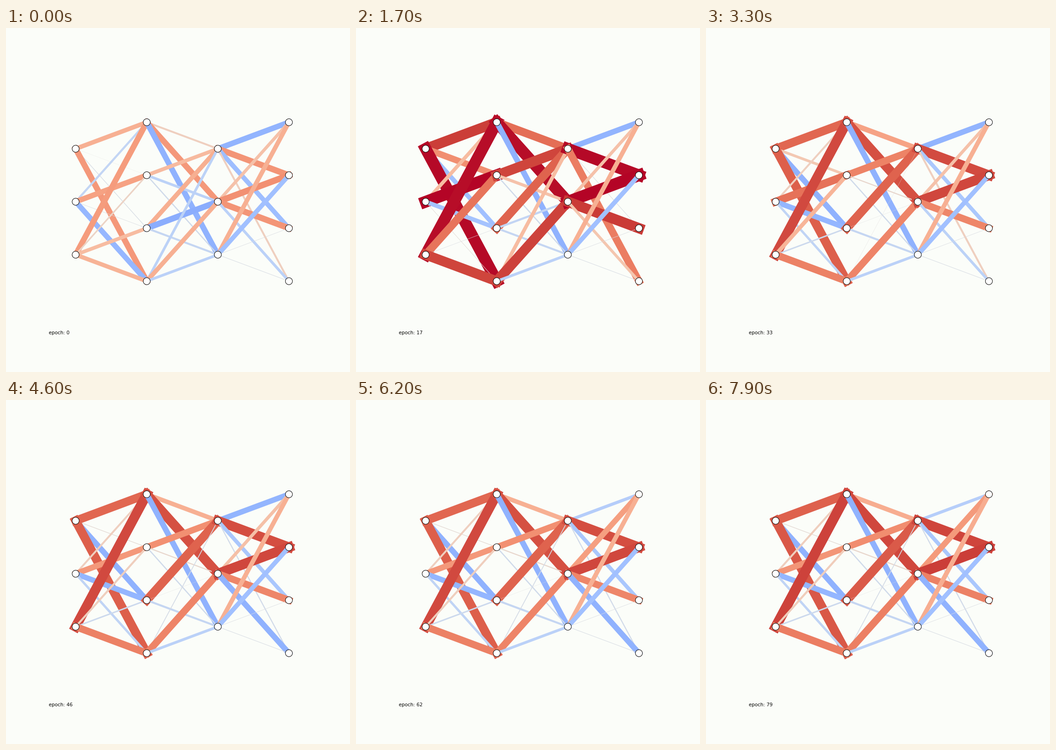
Animation, 748 px wide and 748 px high, one loop 8000 ms. Source, as a matplotlib script:

```python
import matplotlib.pyplot as plt
import numpy as np
from matplotlib.animation import FuncAnimation
from matplotlib.patches import Circle

SIZE, DPI = 748, 64
PT = 72 / DPI              # points per pixel
EPOCHS, STEP_MS = 80, 100
LINK_PX = 25.5             # link width at full weight
PEAK_EPOCH, SETTLE, LATE = 17, 20, 62
BG = "#fbfdf9"


class Layer:
    """Links into one layer.

    All links into a node drift together: up to its peak, then over to its
    rest value around its middle epoch. Gains scale this per sending node.
    """

    def __init__(self, start, peak, rest, middle, peak_gain=1, rest_gain=1):
        self.start = np.array(start)
        rows = np.ones(len(start))
        self.peak = np.outer(rows * peak_gain, peak)
        self.rest = np.outer(rows * rest_gain, rest)
        self.middle = np.array(middle)

    def weights(self, t):
        u = min(t / PEAK_EPOCH, 1)
        rise = u * (1.25 - .25 * u)
        settle = smooth((t - self.middle) / SETTLE + .5)
        w = self.start + rise * self.peak + settle * (self.rest - self.peak)
        swell = 1 + .035 * max(t - LATE, 0) / (EPOCHS - 1 - LATE)
        return np.where(w > 0, w * swell, w)


def smooth(x):
    x = np.clip(x, 0, 1)
    return x * x * (3 - 2 * x)


def column(x, n):
    gap, mid = 115.19, 377.74
    return [(x, mid + (i - (n - 1) / 2) * gap) for i in range(n)]


layers = [
    Layer([[.38, .01, -.05, .50],
           [-.18, .46, -.03, -.45],
           [.49, .13, .31, .36]],
          peak=[.50, .54, -.33, .50], rest=[.34, .04, -.43, .25],
          middle=[24, 31, 24, 24]),
    Layer([[.16, .50, -.48],
           [.32, -.22, -.10],
           [.39, -.51, -.17],
           [-.22, .38, -.23]],
          peak=[.53, .49, 0], rest=[.22, .31, 0], middle=[29, 24, 24],
          peak_gain=[1, 1, .65, 1], rest_gain=[1, 1, 1.6, .7]),
    Layer([[-.47, .52, -.40, .16],
           [.27, .54, .52, -.23],
           [.38, -.39, -.03, -.04]],
          peak=[0, .48, .38, .47], rest=[.21, .30, .07, -.25],
          middle=[54, 24, 24, 31],
          peak_gain=[1, 1, 0], rest_gain=[1, 1, 0]),
]

fig = plt.figure(figsize=(SIZE / DPI, SIZE / DPI), dpi=DPI, facecolor=BG)
ax = fig.add_axes([0, 0, 1, 1])
ax.set(xlim=(0, SIZE), ylim=(SIZE, 0))
ax.axis("off")

columns = [column(151.47 + 154.58 * i, n) for i, n in enumerate((3, 4, 3, 4))]
links = [ax.plot([a[0], b[0]], [a[1], b[1]],
                 solid_capstyle="projecting", zorder=2)[0]
         for left, right in zip(columns, columns[1:])
         for a in left for b in right]

for node in sum(columns, []):
    ax.add_patch(Circle(node, 7.6, fc="white", ec="black",
                        lw=1.0 * PT, zorder=4))

label = ax.text(93.5, 665.7, "", fontsize=10.42 * PT, family="DejaVu Sans",
                color="black", va="baseline", zorder=5)


def update(epoch):
    weights = np.concatenate([la.weights(epoch).ravel() for la in layers])
    for line, w in zip(links, weights):
        line.set_linewidth(LINK_PX * abs(w) * PT)
        line.set_color(plt.cm.coolwarm(float(np.clip(.5 + w / 2, 0, 1))))
    label.set_text(f"epoch: {epoch}")
    return links + [label]


anim = FuncAnimation(fig, update, frames=EPOCHS, interval=STEP_MS,
                     repeat=True, repeat_delay=0)
plt.show()
```
